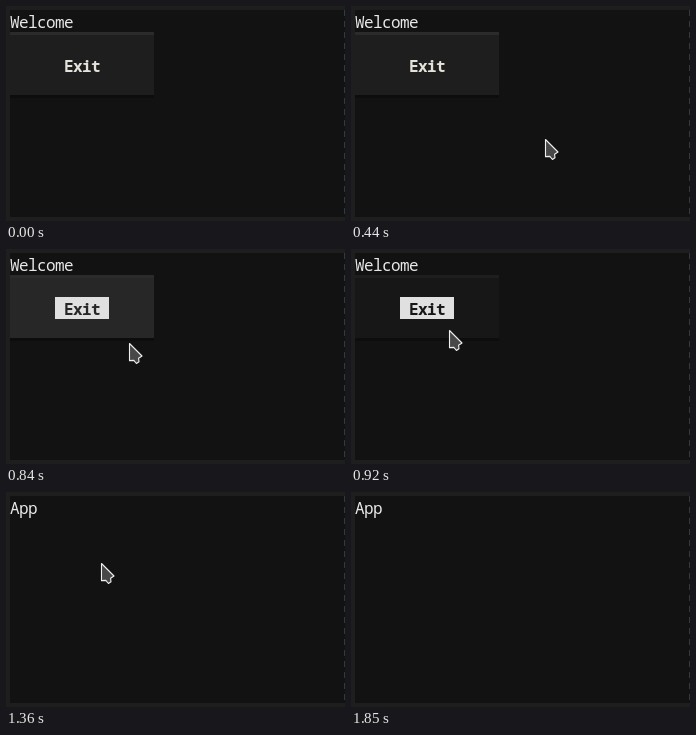
An HTML page with a canvas for the animation above (2.55 s loop, 339 by 215 pixels).

```html
<!DOCTYPE html>
<html>
<head>
<meta charset="utf-8">
<style>
  html, body { margin: 0; width: 100%; height: 100%; overflow: hidden; background: #121212; }
  canvas { display: block; }
</style>
</head>
<body>
<canvas id="stage" width="339" height="215"></canvas>
<script>
const LOOP = 2550;
const ctx = document.getElementById('stage').getContext('2d');

const easeIn = k => k * k;
const easeOut = k => 1 - (1 - k) ** 2;
const smooth = k => k * k * (3 - 2 * k);

// Pointer stops: each move starts where the one before ended
const stops = {
  entry: [150, 204], bend: [181, 137], focus: [196, 133],
  near: [98, 81], button: [95, 71], leave: [93, 80], away: [348, 258]
};
const moves = [
  { start: 80, end: 280, from: 'entry', to: 'bend', ease: easeOut },
  { start: 280, end: 520, from: 'bend', to: 'focus', ease: easeOut },
  { start: 680, end: 920, from: 'focus', to: 'near', ease: smooth },
  { start: 920, end: 1200, from: 'near', to: 'button', ease: easeOut },
  { start: 1650, end: 1850, from: 'leave', to: 'away', ease: easeIn }
];
const arrow = new Path2D('M.5 .5L13 13L9.6 15.3L10 18.8L7.4 20.5L4.8 17.4L.5 17.6Z');

function rect(color, x, y, w, h) {
  ctx.fillStyle = color;
  ctx.fillRect(x, y, w, h);
}

function text(str, x, y, color, weight = 500) {
  ctx.font = `${weight} 16px "Noto Sans Mono", monospace`;
  ctx.letterSpacing = '-0.6px';
  ctx.fillStyle = color;
  ctx.fillText(str, x, y);
}

function pointerAt(t) {
  const move = moves.findLast(m => t >= m.start);
  if (!move) return null;
  const k = move.ease(Math.min(1, (t - move.start) / (move.end - move.start)));
  const from = stops[move.from], to = stops[move.to];
  return from.map((v, i) => Math.round(v + (to[i] - v) * k));
}

function drawWindow() {
  rect('#1e1e1e', 0, 0, 339, 215);
  rect('#121212', 4, 4, 335, 207);
  for (let y = 4; y < 211; y += 11) rect('#333a3e', 338, y, 1, 6);
}

function drawButton(t) {
  const hover = t >= 880, focused = t >= 560;
  const face = hover ? '#171717' : t >= 680 ? '#272727' : '#1e1e1e';
  rect(face, 4, 29, 144, 60);
  rect(hover ? '#1e1e1e' : '#2b2b2b', 4, 26, 144, 3);
  rect('#0d0d0d', 4, 89, 144, 3);
  if (focused) rect('#e0e0e0', 49, 48, 54, 22);
  text('Exit', 58, 66, focused ? face : '#e5e2da', 700);
}

function drawPointer(t) {
  const pos = pointerAt(t);
  if (!pos) return;
  const [x, y] = pos;
  ctx.save();
  ctx.translate(x, y);
  ctx.fillStyle = '#484848';
  ctx.fill(arrow);
  ctx.strokeStyle = '#f0f0f0';
  ctx.lineWidth = 1.1;
  ctx.lineJoin = 'round';
  ctx.stroke(arrow);
  ctx.restore();

  const pressed = (t >= 520 && t < 680) || (t >= 1200 && t < 1320);
  if (pressed) {
    ctx.fillStyle = 'rgba(255, 255, 0, .5)';
    ctx.beginPath();
    ctx.arc(x, y + 2, 15, 0, 7);
    ctx.fill();
  }
}

function frame() {
  const now = performance.now() % LOOP;
  // The screen is sampled every 40 ms
  const start = now < 1650 ? 0 : 1650;
  const t = start + Math.floor((now - start) / 40) * 40;

  drawWindow();
  if (t < 1360) {
    text('Welcome', 4, 22, '#e8e8e8');
    drawButton(t);
  } else {
    text('App', 4, 22, '#e8e8e8');
  }
  drawPointer(t);
  requestAnimationFrame(frame);
}
frame();
</script>
</body>
</html>
```
